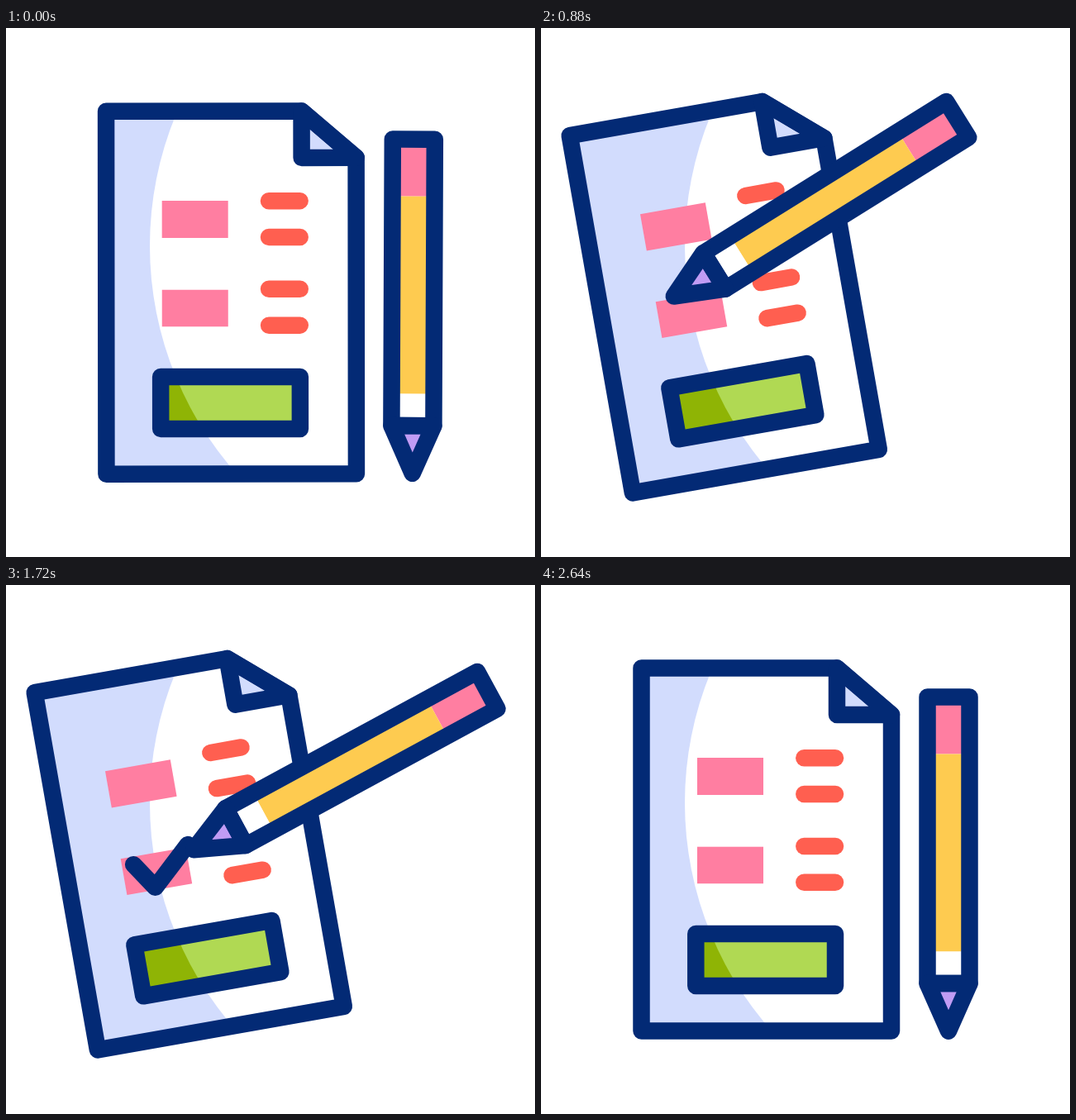
Write an HTML page with a canvas that moves like this. It is 640x640 px and loops after 2.82 s.

```html
<!DOCTYPE html>
<html lang="en">
<head>
<meta charset="utf-8">
<title>Form and pencil</title>
<style>
  html, body { margin: 0; width: 100%; height: 100%; overflow: hidden; background: #fff; }
  canvas { display: block; width: 640px; height: 640px; }
</style>
</head>
<body>
<canvas id="stage" width="640" height="640"></canvas>
<script>
const ctx = document.getElementById('stage').getContext('2d');
const LOOP = 2820;
const STROKE = 20.5;
const NAVY = '#032a75', SHADE = '#d2dcfd', PINK = '#ff7ea1', RED = '#ff5f50',
      GREEN = '#b0d953', DARK_GREEN = '#8fb405', YELLOW = '#fecb50', PURPLE = '#c19cf4';

// Pencil poses: position of the tip and tilt in degrees
const REST = { x: 493, y: 539.7, tilt: 0 };
const WRITE_START = { x: 160, y: 324, tilt: 58.2 };
const WRITE_END = { x: 227, y: 320.2, tilt: 61.5 };

const PAGE = [[358, 100.5], [121.5, 100.5], [121.5, 539.5], [424, 539.5], [424, 157]];
const FOLD = [[358, 100.5], [358, 157], [424, 157]];
const BOX = [[187.3, 422], [356, 422], [356, 485], [187.3, 485]];
const CHECK = [[203, 326.2], [224.3, 358], [272, 313.8]];

const clamp = v => Math.min(1, Math.max(0, v));
const lerp = (a, b, p) => a + (b - a) * p;
const mix = (a, b, p) => ({ x: lerp(a.x, b.x, p), y: lerp(a.y, b.y, p), tilt: lerp(a.tilt, b.tilt, p) });
const easeOut = (t, start, span) => 1 - (1 - clamp((t - start) / span)) ** 5;
const easeInOut = (t, start, span) => (1 - Math.cos(Math.PI * clamp((t - start) / span))) / 2;
const rad = deg => deg * Math.PI / 180;

function trace(points, close = true) {
  ctx.beginPath();
  points.forEach(([x, y]) => ctx.lineTo(x, y));
  if (close) ctx.closePath();
}

function fillRect(x, y, w, h, color) {
  ctx.fillStyle = color;
  ctx.fillRect(x, y, w, h);
}

function fillShape(points, color) {
  trace(points);
  ctx.fillStyle = color;
  ctx.fill();
}

function outline(points, close = true, color = NAVY) {
  trace(points, close);
  ctx.strokeStyle = color;
  ctx.stroke();
}

// The lit area is a circle that stays still on the stage while the page turns
function litShape(points, dark, light) {
  fillShape(points, dark);
  ctx.save();
  ctx.clip();
  ctx.setTransform(1, 0, 0, 1, 0, 0);
  ctx.beginPath();
  ctx.arc(589, 263.5, 415, 0, Math.PI * 2);
  ctx.fillStyle = light;
  ctx.fill();
  ctx.restore();
}

function drawCheck(amount) {
  if (amount <= 0.002) return;
  const [a, b, c] = CHECK;
  const first = Math.hypot(b[0] - a[0], b[1] - a[1]);
  const second = Math.hypot(c[0] - b[0], c[1] - b[1]);
  const length = amount * (first + second);
  const along = (p, q, f) => [lerp(p[0], q[0], f), lerp(p[1], q[1], f)];
  const points = length < first
    ? [a, along(a, b, length / first)]
    : [a, b, along(b, c, (length - first) / second)];
  outline(points, false);
}

function drawPage(turn, check) {
  ctx.save();
  ctx.translate(272.75 - 51 * turn, 320);
  ctx.rotate(rad(-10 * turn));
  ctx.translate(-272.75, -320);

  litShape(PAGE, SHADE, '#fff');
  fillShape(FOLD, SHADE);
  outline(PAGE);
  outline(FOLD);
  fillRect(189, 209, 80, 45, PINK);
  fillRect(189, 316.7, 80, 44.5, PINK);
  for (const y of [209.2, 253, 315.9, 359.7]) outline([[318.3, y], [356, y]], false, RED);
  litShape(BOX, DARK_GREEN, GREEN);
  outline(BOX);
  drawCheck(check);
  ctx.restore();
}

function drawPencil({ x, y, tilt }) {
  ctx.save();
  ctx.translate(x, y);
  ctx.rotate(rad(tilt));
  ctx.translate(-REST.x, -REST.y);

  fillRect(467.5, 135.5, 51, 69, PINK);
  fillRect(467.5, 204.5, 51, 239, YELLOW);
  fillRect(467.5, 443.5, 51, 38.5, '#fff');
  const tip = [[467.5, 482], [518.5, 482], [REST.x, REST.y]];
  fillShape(tip, PURPLE);
  outline([[467.5, 135.5], [518.5, 135.5], [518.5, 482], [467.5, 482]]);
  outline(tip);
  ctx.restore();
}

function pencilPose(t, back) {
  if (t < 910) return mix(REST, WRITE_START, easeOut(t, 0, 1250));
  const p = easeOut(t, 910, 950);
  const pose = mix(WRITE_START, WRITE_END, p);
  pose.y += 3 * Math.sin(Math.PI * p);
  pose.tilt = lerp(WRITE_START.tilt, WRITE_END.tilt, 1 - (1 - p) ** 2);
  return mix(pose, REST, back);
}

function draw(t) {
  const back = easeInOut(t, 1840, 800);
  const turn = easeOut(t, 0, 1030) * (1 - back);
  const check = easeOut(t, 910, 950) * (1 - easeInOut(t, 1980, 660));

  fillRect(0, 0, 640, 640, '#fff');
  ctx.lineWidth = STROKE;
  ctx.lineCap = ctx.lineJoin = 'round';
  drawPage(turn, check);
  drawPencil(pencilPose(t, back));
}

const start = performance.now();
function tick() {
  draw((performance.now() - start) % LOOP);
  requestAnimationFrame(tick);
}
tick();
</script>
</body>
</html>
```
